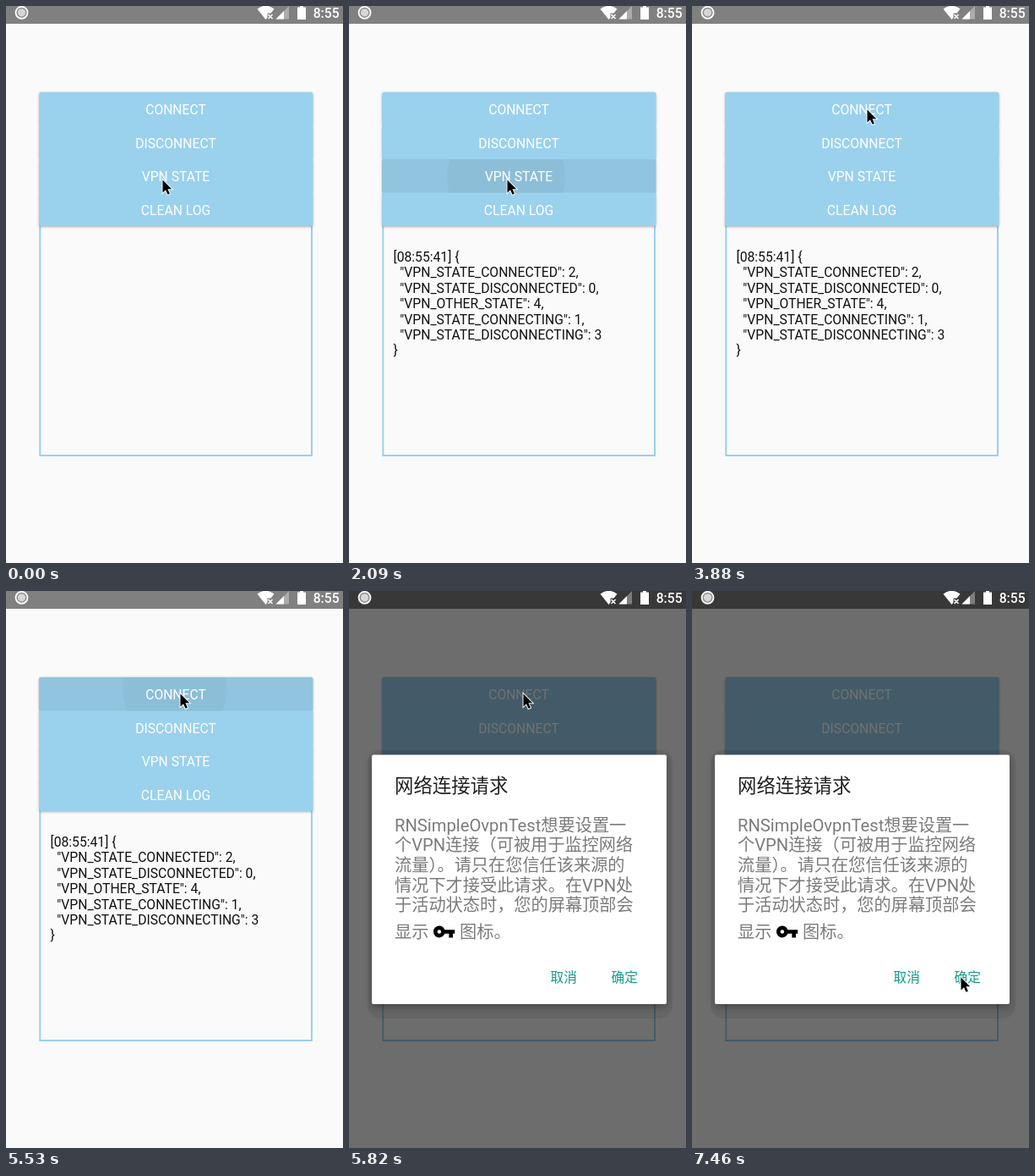
Recreate the animation shown at these times as an HTML page. Size 399 by 658 pixels, loop 8 s.

```html
<!DOCTYPE html>
<html lang="zh-CN">
<head>
<meta charset="utf-8">
<title>VPN demo</title>
<style>
  html, body { margin: 0; width: 100%; height: 100%; overflow: hidden; background: #fafafa; }
  body > svg { display: block; width: 100vw; height: 100vh; }
  text { font: 15.7px Roboto, "Noto Sans CJK SC", "Noto Sans CJK", sans-serif; white-space: pre; }

  .button { fill: #9ad1ed; filter: drop-shadow(0 1.5px 1.5px rgba(0, 0, 0, .3)); }
  .face { fill: #9ad1ed; }
  .labels { fill: #fff; text-anchor: middle; }
  .log { fill: #111; }
  .panel { fill: none; stroke: #9ad1ed; stroke-width: 2; }
  .dialog { fill: #fff; filter: drop-shadow(0 3px 4px rgba(0, 0, 0, .3)); }
  .title { font-size: 22.4px; fill: #212121; }
  .message text { font-size: 20.2px; fill: #7b7b7b; }
  .actions { fill: #139a8b; }
  .clock { font-weight: 500; fill: #fff; }

  /* every state change is a hard cut within one 8 s loop */
  .log, .press, .ripple, .dim, .modal, .halo, .cursor { animation: 8s step-end infinite; }
  .log { animation-name: log; }
  .press { opacity: 0; }
  .state { animation-name: state-press; }
  .connect { animation-name: connect-press; }
  .ripple { animation-name: ripple; }
  .dim { animation-name: dim; }
  .modal { animation-name: modal; }
  .halo { animation-name: halo; }
  .cursor { animation-name: cursor; }

  @keyframes log { 0% { opacity: 0 } 26.125%, 100% { opacity: 1 } }
  @keyframes state-press { 0%, 29.875%, 100% { opacity: 0 } 26.125% { opacity: 1 } }
  @keyframes connect-press { 0%, 72.75%, 100% { opacity: 0 } 67.25% { opacity: .7 } 69.125% { opacity: 1 } 70.875% { opacity: .6 } }
  @keyframes ripple { 0% { r: 28px } 69.125% { r: 62px } 70.875%, 100% { r: 0px } }
  @keyframes dim { 0% { opacity: 0 } 70.875% { opacity: .42 } 72.75%, 100% { opacity: .56 } }
  @keyframes modal { 0% { opacity: 0 } 70.875%, 100% { opacity: 1 } }
  @keyframes halo { 0%, 72.75%, 100% { opacity: 0 } 70.875% { opacity: 1 } }
  @keyframes cursor {
    0% { transform: translate(185px, 205px) }
    1.875% { transform: translate(187px, 205px) }
    39.25% { transform: translate(188px, 199px) }
    41.125% { transform: translate(192px, 177px) }
    43% { transform: translate(198px, 151px) }
    44.875% { transform: translate(203px, 133px) }
    46.625% { transform: translate(206px, 124px) }
    48.5% { transform: translate(207px, 122px) }
    56% { transform: translate(206px, 121px) }
    74.625% { transform: translate(207px, 134px) }
    76.5% { transform: translate(213px, 188px) }
    78.375% { transform: translate(226px, 272px) }
    80.25% { transform: translate(242px, 346px) }
    82.125% { transform: translate(264px, 389px) }
    84% { transform: translate(283px, 418px) }
    85.875% { transform: translate(298px, 437px) }
    87.75% { transform: translate(309px, 448px) }
    89.5% { transform: translate(315px, 453px) }
    91.375% { transform: translate(317px, 455px) }
    93.25%, 100% { transform: translate(318px, 456px) }
  }
</style>
</head>
<body>
<svg viewBox="0 0 399 658" preserveAspectRatio="none">
  <rect width="399" height="658" fill="#fafafa"/>
  <rect width="399" height="21" fill="#808080"/>

  <rect class="panel" x="40.3" y="250" width="321.7" height="281"/>
  <g class="log">
    <text x="52.5" y="302">[08:55:41] {</text>
    <text x="52.5" y="320.4">  "VPN_STATE_CONNECTED": 2,</text>
    <text x="52.5" y="338.8">  "VPN_STATE_DISCONNECTED": 0,</text>
    <text x="52.5" y="357.2">  "VPN_OTHER_STATE": 4,</text>
    <text x="52.5" y="375.5">  "VPN_STATE_CONNECTING": 1,</text>
    <text x="52.5" y="393.9">  "VPN_STATE_DISCONNECTING": 3</text>
    <text x="52.5" y="412.2">}</text>
  </g>

  <g class="button">
    <rect x="39.3" y="101.7" width="324" height="39.6" rx="2"/>
    <rect x="39.3" y="141.3" width="324" height="39.6" rx="2"/>
    <rect x="39.3" y="180.9" width="324" height="39.6" rx="2"/>
    <rect x="39.3" y="220.5" width="324" height="39.6" rx="2"/>
  </g>
  <rect class="face" x="39.3" y="104" width="324" height="154"/>

  <svg x="39" y="181" width="324" height="39.5">
    <g class="press state">
      <rect width="324" height="39.5" opacity=".06"/>
      <circle cx="147" cy="21" r="70" opacity=".03"/>
    </g>
  </svg>
  <svg x="39" y="102" width="324" height="39.5">
    <g class="press connect">
      <rect width="324" height="39.5" opacity=".06"/>
      <circle class="ripple" cx="161" cy="14" r="62" opacity=".03"/>
    </g>
  </svg>

  <g class="labels">
    <text x="201" y="128.3">CONNECT</text>
    <text x="201" y="167.7">DISCONNECT</text>
    <text x="201" y="207.1">VPN STATE</text>
    <text x="201" y="246.5">CLEAN LOG</text>
  </g>

  <rect class="dim" width="399" height="658"/>

  <g fill="#fff">
    <circle cx="18.5" cy="7.8" r="7" fill="#8d8d8d" stroke="#fff" stroke-width="1.8"/>
    <circle cx="18.5" cy="7.8" r="4.6" opacity=".65"/>
    <path d="M297.5 3.5Q307.500-4 317.500 3.500L313.500 8.500H309.500V13.500L307.500 16Z"/>
    <path d="M310.500 10L315.500 15M315.500 10L310.500 15" stroke="#fff" stroke-width="1.500"/>
    <path d="M319.500 15.500H335V0Z" opacity=".35"/>
    <path d="M319.500 15.500H329V6Z"/>
    <path d="M345 1.500H348V-1H352V1.500H355V16H345Z"/>
    <text class="clock" x="363.700" y="13.800">8:55</text>
  </g>

  <g class="modal">
    <rect class="halo" x="8" y="183" width="389" height="335" rx="20" fill-opacity=".05"/>
    <rect x="22" y="188" width="361" height="317" rx="15" fill-opacity=".07"/>
    <rect class="dialog" x="27" y="193.500" width="349" height="294.500" rx="2"/>
    <text class="title" x="54" y="237.500">网络连接请求</text>
    <g class="message">
      <text x="54" y="283.700">RNSimpleOvpnTest想要设置一</text>
      <text x="54" y="307.300">个VPN连接（可被用于监控网络</text>
      <text x="54" y="331">流量）。请只在您信任该来源的</text>
      <text x="54" y="354.700">情况下才接受此请求。在VPN处</text>
      <text x="54" y="378.300">于活动状态时，您的屏幕顶部会</text>
      <text x="54" y="409.700">显示</text>
      <text x="131" y="409.700">图标。</text>
    </g>
    <path transform="translate(98.800 388.700) scale(1.150)" d="M12.650 10C11.830 7.670 9.610 6 7 6A6 6 0 0 0 7 18C9.610 18 11.830 16.330 12.650 14H17V18H21V14H23V10ZM7 14A2 2 0 0 1 7 10A2 2 0 0 1 7 14Z"/>
    <g class="actions">
      <text x="238.500" y="462">取消</text>
      <text x="310.500" y="462">确定</text>
    </g>
  </g>

  <g class="cursor">
    <path d="M.5.5V15.500L4 12.300L6.500 17.800L8.900 16.700L6.400 11.300H11.200Z" stroke="#fff" stroke-width="2" paint-order="stroke" stroke-opacity=".9"/>
  </g>
</svg>
</body>
</html>
```
